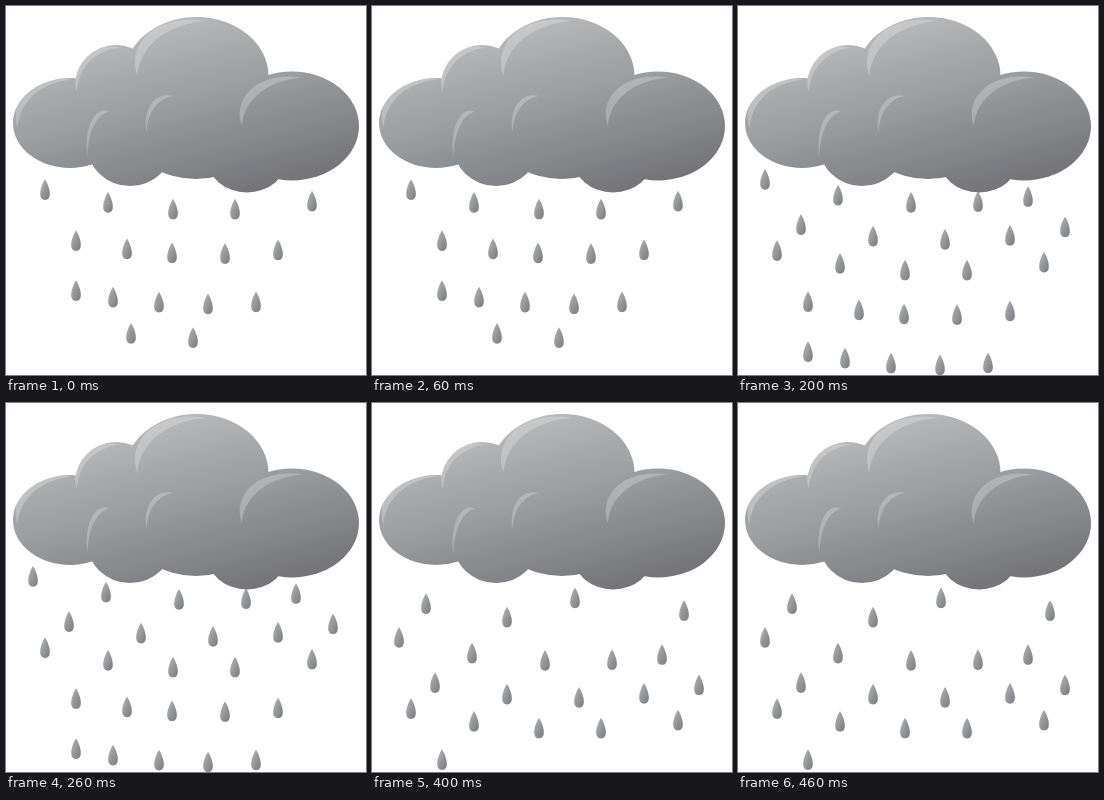
Animation of 360 by 369 pixels, one loop 500 ms. Source, as an HTML page:

```html
<!DOCTYPE html>
<html lang="en">
<head>
<meta charset="utf-8">
<title>Rain cloud</title>
<style>
  html, body { margin: 0; width: 100%; height: 100%; overflow: hidden; background: #fff; }
  svg { display: block; width: 100%; height: 100%; }
</style>
</head>
<body>
<svg viewBox="0 0 360 369">
  <defs>
    <linearGradient id="shade" gradientUnits="userSpaceOnUse" x1="160" y1="0" x2="212" y2="195">
      <stop stop-color="#bcbdbe"/><stop offset=".5" stop-color="#989c9e"/><stop offset="1" stop-color="#747479"/>
    </linearGradient>
    <linearGradient id="wet" x1="0" y1="0" x2="1" y2="1">
      <stop offset=".2" stop-color="#a6aaad"/><stop offset=".9" stop-color="#7e8083"/>
    </linearGradient>
    <path id="drop" fill="url(#wet)" d="M0-10.5C2.2-7 4.8-1 4.8 4C4.8 8 3.2 10.2 0 10.2S-4.8 8-4.8 4C-4.8-1-2.2-7 0-10.5Z"/>
    <path id="crescent" d="M.06 1C-.1 .4 .35-.1 1 .03C.5 .09 .1 .42 .06 1Z"/>
  </defs>
  <g id="rain"></g>
  <g fill="url(#shade)">
    <ellipse cx="64" cy="117" rx="57" ry="45"/>
    <ellipse cx="110" cy="79" rx="41" ry="40"/>
    <ellipse cx="190.5" cy="70" rx="72" ry="59"/>
    <ellipse cx="190" cy="131" rx="62" ry="42"/>
    <ellipse cx="124" cy="139" rx="43" ry="41"/>
    <ellipse cx="241" cy="152" rx="40" ry="34.5"/>
    <ellipse cx="286" cy="120" rx="67" ry="54.5"/>
  </g>
  <g fill="#fff" fill-opacity=".24">
    <use href="#crescent" transform="translate(8 72) scale(58 50)"/>
    <use href="#crescent" transform="translate(68 40) scale(46 46)"/>
    <use href="#crescent" transform="translate(127 13) scale(73 57)"/>
    <use href="#crescent" transform="translate(139 89) scale(28 37)"/>
    <use href="#crescent" transform="translate(80 104) scale(23 47)"/>
    <use href="#crescent" transform="translate(232 70) scale(64 50)"/>
  </g>
</svg>
<script>
const STEP = 100, STEPS = 5, FALL = 30.5, GROUND = 364;
const rain = document.getElementById('rain');

// Each row of drops sets out at one step, bowed like the underside of the cloud
const rows = [
  { start: 0, y: 204, xs: [39, 102, 167, 229, 306] },
  { start: 0, y: 248, xs: [70, 121, 166, 219, 272] },
  { start: 0, y: 298, xs: [70, 107, 153, 202, 250] },
  { start: 0, y: 332, xs: [125, 187] },
  { start: 1, y: 203, xs: [63, 135, 207, 272, 327] },
  { start: 2, y: 197, xs: [27, 100, 173, 240, 290] },
  { start: 3, y: 187, xs: [54, 135, 312] },
  { start: 4, y: 195, xs: [203] }
];
const bow = x => 20 * ((x - 200) / 160) ** 2;

function draw(step) {
  let drops = '';
  for (const { start, y, xs } of rows) {
    if (step < start) continue;
    for (const x of xs) {
      const dropY = y - bow(x) + FALL * (step - start);
      if (dropY < GROUND) drops += `<use href="#drop" x="${x}" y="${dropY}"/>`;
    }
  }
  rain.innerHTML = drops;
}

let shown = -1;
function tick() {
  const step = Math.floor(performance.now() / STEP) % STEPS;
  if (step !== shown) draw(shown = step);
  requestAnimationFrame(tick);
}
tick();
</script>
</body>
</html>
```
